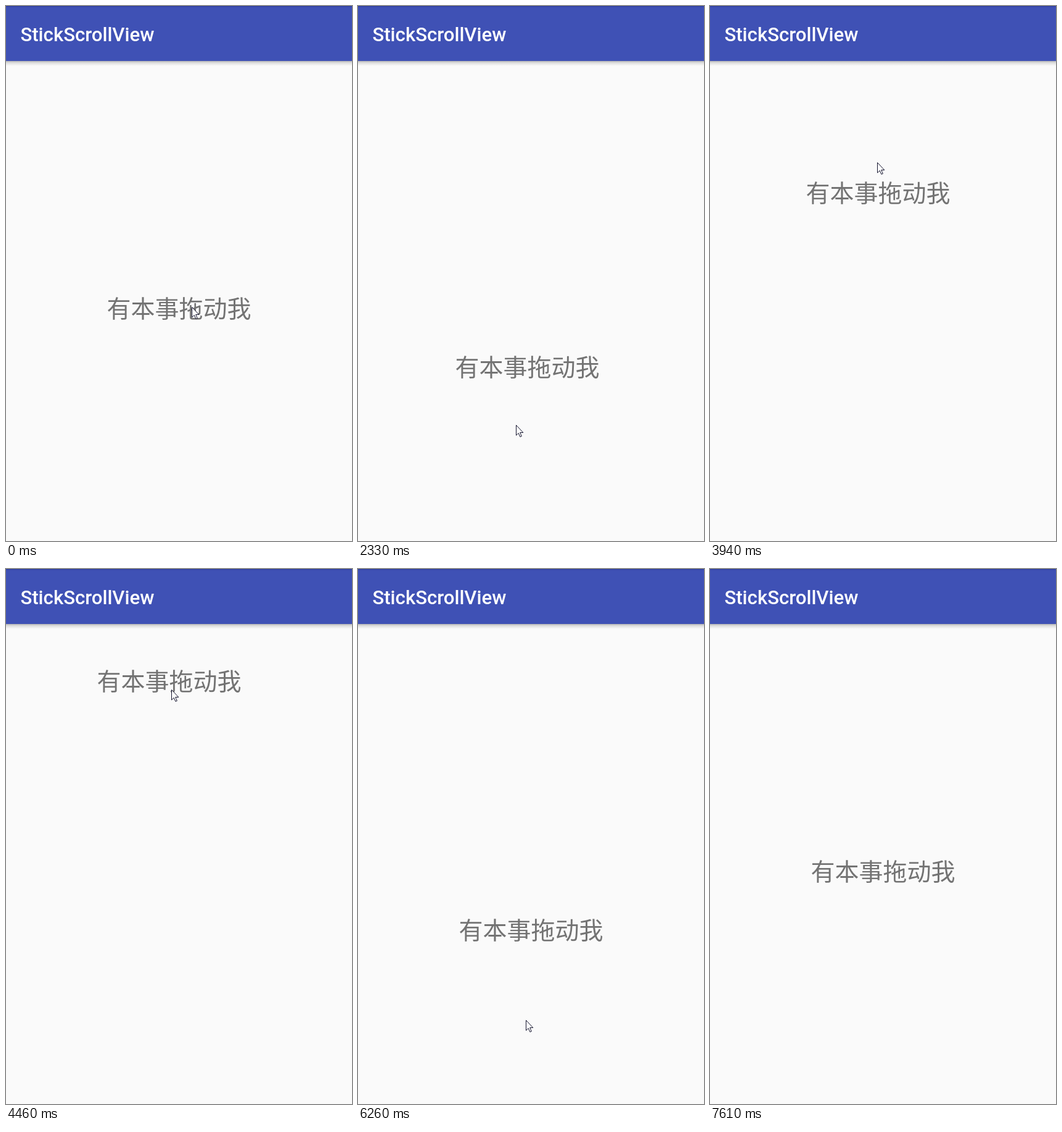
These frames come from a looping animation (561x866 px, 7970 ms). An HTML page:

```html
<!DOCTYPE html>
<html lang="zh-CN">
<head>
<meta charset="utf-8">
<title>StickScrollView</title>
<style>
html, body { margin: 0; width: 100%; height: 100%; overflow: hidden; background: #fafafa; }
svg { display: block; width: 561px; height: 866px; }
#title { font: 500 31.16px Roboto, sans-serif; fill: #fff; }
#label { font: 400 39px "Noto Sans CJK SC", "Noto Sans CJK", sans-serif; fill: #737373; text-anchor: middle; }
</style>
</head>
<body>
<svg viewBox="0 0 561 866">
  <defs>
    <linearGradient id="shade" x2="0" y2="1">
      <stop stop-opacity=".28"/>
      <stop offset=".35" stop-opacity=".12"/>
      <stop offset="1" stop-opacity="0"/>
    </linearGradient>
  </defs>
  <text id="label" x="280.5" y="504">有本事拖动我</text>
  <rect y="89" width="561" height="8" fill="url(#shade)"/>
  <rect width="561" height="89" fill="#3f51b5"/>
  <rect width="561" height="1.5" fill="#303f9f"/>
  <text id="title" x="23.4" y="57">StickScrollView</text>
  <path id="cursor" d="M.5.5v16.5l3.7-3.6 2.7 6 2.4-1-2.6-5.9h5.1z" fill="#fff" stroke="#15152e"/>
</svg>
<script>
const LOOP = 7970, TICK = 135, LAG = 100, SPRING = 100;

// The screen refreshes every TICK, counted anew from each of these times
const bursts = [0, 150, 1220, 2330, 3480, 4610, 5720, 6800];

// Pointer path: [ms, x, y]
const pointer = [
  [0, 301, 487], [790, 262, 500], [1100, 262, 500], [1525, 204, 695],
  [1625, 199, 717], [2180, 251, 712], [3140, 283, 496], [3400, 283, 496],
  [3785, 275, 309], [3885, 271, 253], [4200, 266, 180], [4500, 268, 200],
  [5015, 262, 367], [5600, 272, 602], [5720, 272, 602], [6160, 272, 697],
  [6260, 272, 730], [6935, 397, 880]
];

// Drags: [press ms, release ms]
const drags = [[1100, 2250], [3400, 4550], [5720, 6935]];

function pointerAt(t) {
  const i = pointer.findIndex(p => p[0] > t);
  if (i < 0) return pointer.at(-1).slice(1);
  const [t0, x0, y0] = pointer[i - 1], [t1, x1, y1] = pointer[i];
  const k = (t - t0) / (t1 - t0);
  return [x0 + (x1 - x0) * k, y0 + (y1 - y0) * k];
}

// While held the label trails the pointer; once released it springs home
function labelOffset(t) {
  const drag = drags.findLast(d => d[0] <= t);
  if (!drag) return [0, 0];
  const [press, release] = drag;
  const start = pointerAt(press);
  const end = pointerAt(Math.max(press, Math.min(t, release) - LAG));
  const left = Math.exp(-Math.max(0, t - release) / SPRING);
  return end.map((v, i) => (v - start[i]) * left);
}

function refreshTime(t) {
  const from = bursts.findLast(b => b <= t);
  return from + Math.floor((t - from) / TICK) * TICK;
}

const place = (id, [x, y]) => document.getElementById(id)
  .setAttribute("transform", `translate(${Math.round(x)} ${Math.round(y)})`);

function draw(now) {
  const t = refreshTime(now % LOOP);
  place("cursor", pointerAt(t));
  place("label", labelOffset(t));
  requestAnimationFrame(draw);
}
requestAnimationFrame(draw);
</script>
</body>
</html>
```
